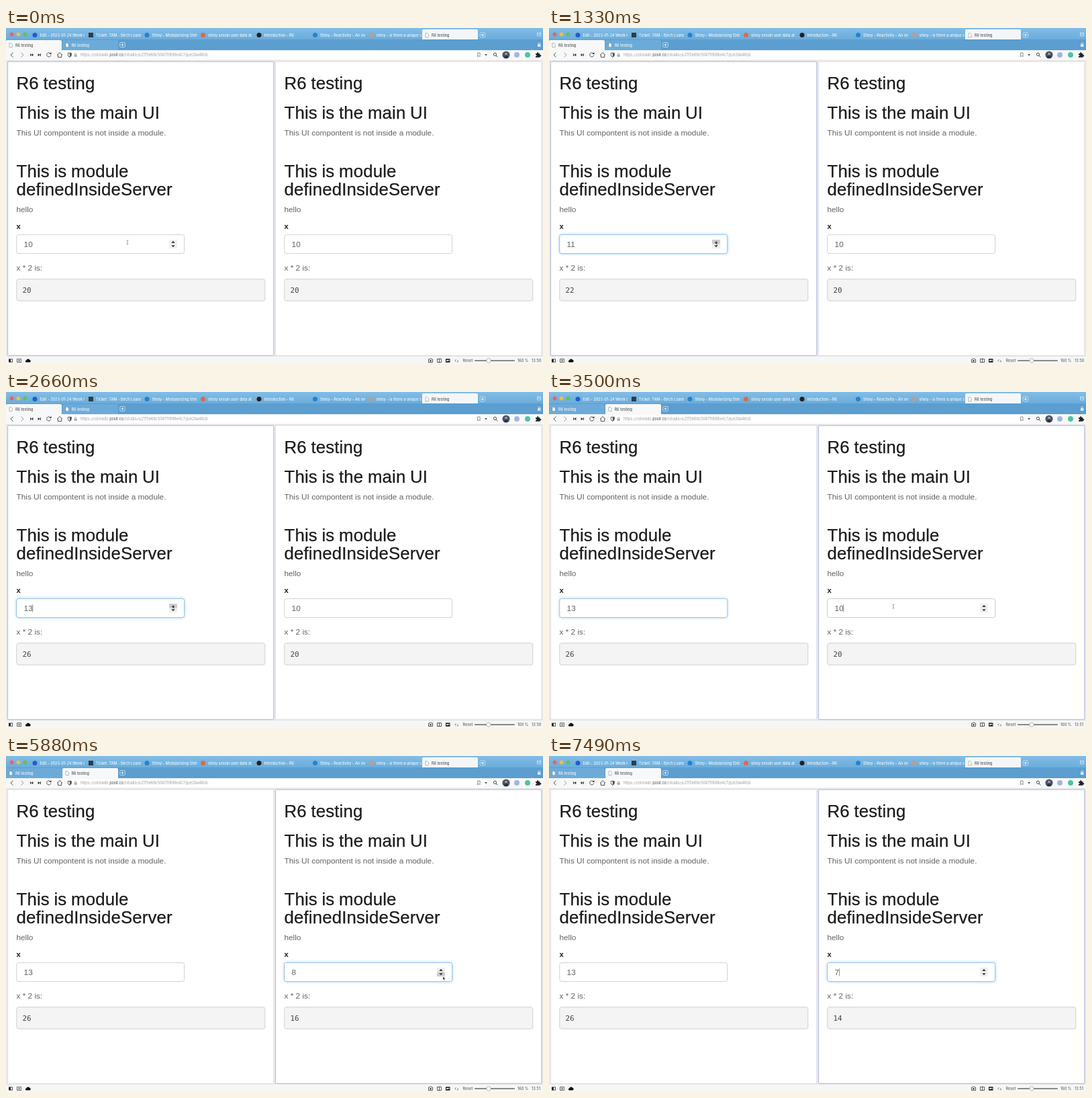
An HTML page for the animation above (7700 ms loop, 800 by 500 pixels).

```html
<!DOCTYPE html>
<html lang="en">
<head>
<meta charset="utf-8">
<title>R6 testing</title>
<style>
  html, body { margin: 0; height: 100%; overflow: hidden; background: #fff; }
  svg#stage { display: block; width: 100vw; height: 100vh; }
  text { white-space: pre; }
  .ui { font: 500 5.5px Inter, sans-serif; }
  .url { font-weight: 400; }
  .h { font: 25.8px "Liberation Sans", Arial, sans-serif; letter-spacing: .15px; word-spacing: -.7px;
       fill: #1c1c1c; stroke: #1c1c1c; stroke-width: .25px; }
  .p { font: 11.8px "Liberation Sans", Arial, sans-serif; fill: #626262; }
  .b { font: bold 11.3px "Liberation Sans", Arial, sans-serif; fill: #222; }
  .code { font: 11px "DejaVu Sans Mono", monospace; fill: #444; }
  .line { fill: none; stroke: #444; stroke-width: .9; }
  .glow { filter: drop-shadow(0 0 2.2px rgba(102, 175, 233, .6)); }
</style>
</head>
<body>
<svg id="stage" viewBox="0 0 800 500" preserveAspectRatio="none">
  <defs>
    <linearGradient id="bar" x2="0" y2="1">
      <stop offset="0" stop-color="#82bde6"/><stop offset="1" stop-color="#6aacdb"/>
    </linearGradient>
  </defs>
  <g id="chrome"></g>
  <g id="live"></g>
</svg>
<script>
const LOOP = 7700, STEP = 70, PANE_SHIFT = 399;
const SWITCH = 3480;   // second pane takes the focus
const FADE = 150, BLINK = 500, OUTPUT_LAG = 140;

const CLICKS = [
  [[0, 10], [770, 11], [1540, 12], [2310, 13]],
  [[0, 10], [4550, 9], [5320, 8], [6160, 7]],
];
// time, x, y of the pointer
const POINTER = [
  [0, 181, 319], [210, 181, 319], [630, 248, 317], [2730, 248, 317], [3300, 513, 319],
  [3570, 513, 319], [4130, 651, 328], [6790, 651, 328], [7000, 520, 320],
];
const POINTER_HIDDEN = 6860;

const rect = (x, y, w, h, fill, more = '') =>
  `<rect x="${x}" y="${y}" width="${w}" height="${h}" fill="${fill}" ${more}/>`;
const disc = (x, y, r, fill, more = '') => `<circle cx="${x}" cy="${y}" r="${r}" fill="${fill}" ${more}/>`;
const path = (d, more = 'class="line"') => `<path d="${d}" ${more}/>`;
const solid = (d, fill = '#333') => path(d, `fill="${fill}"`);
const text = (x, y, cls, str, more = '') => `<text x="${x}" y="${y}" class="${cls}" ${more}>${str}</text>`;
const clipped = (x, y, w, str, fill) =>
  `<svg x="${x}" y="${y - 8}" width="${w}" height="12">${text(0, 8, 'ui', str, `fill="${fill}"`)}</svg>`;
const page = (x, y) => path(`M${x - 2} ${y - 3}h2.6l1.6 1.6v4.4h-4.2z`, 'fill="#fff" stroke="#888" stroke-width=".6"');
const plus = (x, y) => rect(x - 3.8, y - 3.5, 7.6, 7, 'none', 'rx="1.5" stroke="#cfe4f4" stroke-width=".8"') +
  path(`M${x - 2} ${y}h4M${x} ${y - 2}v4`, 'stroke="#fff" stroke-width=".8"');
const tab = (x, y, w, h, fill) => solid(`M${x} ${y + h}v${2 - h}q0-2 2-2h${w - 4}q2 0 2 2v${h - 2}z`, fill);

function titleBar() {
  const titles = [
    ['#1f5fd0', 'Edit – 2023-01-24 Week r'], ['#333b45', 'Ticket: TAM – Birch Loans'],
    ['#2583cf', 'Shiny – Modularizing Shin'], ['#de6a45', 'shiny sessin user data at 2'],
    ['#222', 'Introduction – R6'], ['#2583cf', 'Shiny – Reactivity – An ove'],
    ['#b9a08f', 'shiny – is there a unique s'],
  ];
  let out = rect(0, 0, 800, 17, 'url(#bar)') + rect(0, 17, 800, 16, '#5b9ecf');
  ['#f2605a', '#f3bd3f', '#5cc454'].forEach((c, i) => out += disc(8.5 + 10 * i, 9.5, 2.9, c));
  titles.forEach(([color, title], i) => {
    const x = 43 + 83.5 * i;
    out += (i === 1 ? rect(x - 3.5, 7, 7, 7, color) : disc(x, 10.5, 3.5, color)) + clipped(x + 7.5, 12.7, 67, title, '#f4f9fd');
  });
  return out + tab(620, 2, 83, 15, '#f3f7fa') + page(627, 10.8) + clipped(634, 12.7, 60, 'R6 testing', '#555') +
    plus(710, 10.5) + plus(173.5, 25) +
    path('M791.5 7h5v5h-5zM791.5 9h5', 'fill="none" stroke="#d5e7f5" stroke-width=".8"') +
    rect(792, 24, 4.5, 4, '#d5e7f5') + path('M793 24v-2h2.5v2', 'fill="none" stroke="#d5e7f5" stroke-width=".7"');
}

function toolBar() {
  return rect(0, 33, 800, 16, '#f8f8f8') + rect(89, 34.5, 625, 11.5, '#fff', 'rx="2"') + rect(0, 48, 800, 1, '#e2e2e2') +
    path('M10.5 36.5l-3.5 3.5 3.5 3.5') + path('M22.5 36.5l3.5 3.5-3.5 3.5', 'class="line" opacity=".6"') +
    solid('M36 38h.9v4h-.9zM40.4 38v4l-3.5-2zM47.6 38v4l3.5-2zM51.1 38h.9v4h-.9z') +
    path('M66 37.8a3.1 3.1 0 1 0 .8 2.6') + solid('M64.5 38.9h3v-3z') +
    path('M76 40.3l4-3.8 4 3.8M77.3 39.5v4h5.4v-4') +
    path('M92.3 37.3h5v3q0 2-2.5 3.2-2.5-1.2-2.5-3.2z') + solid('M94.8 37.3h2.5v3q0 2-2.5 3.2z', '#555') +
    rect(101.5, 39.5, 4.2, 3.3, '#aaa') + path('M102.4 39.5v-1.8h2.4v1.8', 'fill="none" stroke="#aaa" stroke-width=".7"') +
    text(111, 42, 'ui url', 'https://colorado.<tspan fill="#444">posit.co</tspan>/rstudio/s/2115e68c50871f898e4c7/p/e2ba46cb', 'fill="#999"') +
    path('M702.5 37h3.6v5.8l-1.8-1.5-1.8 1.5z', 'fill="none" stroke="#666" stroke-width=".7"') + solid('M713.2 39h3.6l-1.8 2.2z') +
    disc(728.5, 39.3, 2.1, 'none', 'stroke="#333" stroke-width=".9"') + path('M730 41l2.4 2.4') +
    disc(745, 40, 5.6, '#46566f') + disc(745, 38.5, 1.8, '#c39a84') + solid('M741.5 43.5q3.5-5 7 0-3.5 3-7 0z', '#26303f') +
    disc(761, 40, 4, '#a5b5e5') + disc(777, 40, 4, '#4cc5a0') +
    solid('M789 38h2.2a1.2 1.2 0 1 1 2 0h2.3v2.2a1.2 1.2 0 1 1 0 2v1.6h-6.5v-2a1 1 0 1 0 0-1.8z', '#222');
}

function statusBar() {
  return rect(0, 488, 800, 12, '#f6f6f6') + rect(0, 488, 800, .6, '#ddd') +
    rect(4, 492.5, 6, 5, '#222') + rect(7, 493.3, 2.3, 3.4, '#fff') +
    path('M16.5 492.5h6v5h-6zM18 494.3h3M18 495.8h3', 'fill="none" stroke="#333" stroke-width=".7"') +
    solid('M30.5 497.5a1.6 1.6 0 0 1 0-3.2 2.5 2.5 0 0 1 4.6-.5 1.9 1.9 0 0 1 .2 3.7z', '#111') +
    path('M629.5 493h1.5l.6-1h2l.6 1h1.3v4.6h-6z', 'fill="none" stroke="#333" stroke-width=".8"') + disc(632.5, 495.2, 1.2, '#333') +
    path('M642.5 492.5h6v5h-6zM645.5 492.5v5', 'fill="none" stroke="#333" stroke-width=".8"') +
    rect(655, 492.3, 6.5, 5.4, '#222') + solid('M656 494h4.5v1.8l-1.5-1-1.5 1.2-1.5-.7z', '#fff') +
    path('M670.5 493.3l-1.7 1.7 1.7 1.7M672 494.5l1.8 1.5-1.8 1.5', 'fill="none" stroke="#444" stroke-width=".7"') +
    text(680.5, 497, 'ui', 'Reset', 'fill="#666"') +
    rect(698, 494.3, 60, 1.4, '#666', 'rx=".7"') + disc(719, 495, 3.2, '#fff', 'stroke="#888" stroke-width=".6"') +
    text(762, 497, 'ui', '160 %', 'fill="#666"');
}

function paneText() {
  return text(15.5, 90.5, 'h', 'R6 testing') + text(15.5, 134.7, 'h', 'This is the main UI') +
    text(15.5, 160, 'p', 'This UI compontent is not inside a module.') +
    text(15.5, 221.6, 'h', 'This is module') + text(15.5, 249, 'h', 'definedInsideServer') +
    text(15.5, 274, 'p', 'hello') + text(15.5, 299.3, 'b', 'x') + text(15.5, 360.5, 'p', 'x * 2 is:') +
    rect(15.8, 373.7, 370, 32.4, '#f4f4f4', 'rx="3" stroke="#ccc" stroke-width=".9"');
}

const lastClick = (clicks, t) => clicks.filter(([at]) => at <= t).pop();
const clamp01 = v => Math.max(0, Math.min(1, v));

function pointerAt(t) {
  const i = POINTER.findLastIndex(([at]) => at <= t);
  const [t0, x0, y0] = POINTER[i], [t1, x1, y1] = POINTER[i + 1] || [LOOP, x0, y0];
  const k = (t - t0) / (t1 - t0), ease = k * k * (3 - 2 * k);
  return { x: x0 + (x1 - x0) * ease, y: y0 + (y1 - y0) * ease };
}

function spinner(pointer) {
  const over = pointer.x > 243 && pointer.x < 255, upper = pointer.y < 321.5;
  return rect(243, 315, 12, 13, '#efefef', 'rx="1"') +
    (over ? rect(243, upper ? 315 : 321.5, 12, 6.5, '#cdcdcd') : '') +
    solid('M246.2 320l2.8-3.2 2.8 3.2zM246.2 323.2h5.6l-2.8 3z', '#3a3a3a');
}

function pane(i, t, cursor) {
  const pointer = { x: cursor.x - i * PANE_SHIFT, y: cursor.y };
  const [clickedAt, value] = lastClick(CLICKS[i], t);
  const output = 2 * lastClick(CLICKS[i], Math.max(0, t - OUTPUT_LAG))[1];
  const focusAt = i ? SWITCH : CLICKS[0][1][0], blurAt = i ? LOOP : SWITCH;
  const glow = clamp01((t - focusAt) / FADE) - clamp01((t - blurAt) / FADE);
  const focused = t >= focusAt && t < blurAt;
  const caret = focused && (t - Math.max(clickedAt, focusAt)) % (2 * BLINK) < BLINK;
  const active = (t >= SWITCH) === !!i;
  const box = (stroke, more) => rect(15.8, 307.6, 249.8, 28, '#fff', `rx="3" stroke="${stroke}" ${more}`);
  return `<g transform="translate(${i * PANE_SHIFT})">` +
    rect(2.6, 50, 396.2, 437.3, '#fff', `rx="1" stroke="${active ? '#b0b4e4' : '#e0e0e0'}" stroke-width="1"`) +
    paneText() + box('#ccc', 'stroke-width=".9"') +
    (glow > 0 ? box('#94c5ef', `class="glow" stroke-width=".9" opacity="${glow}"`) : '') +
    text(26.6, 326, 'p', value) +
    (caret ? rect(26.5 + 6.5 * String(value).length, 316, .7, 11.5, '#666') : '') +
    (pointer.x > 16 && pointer.x < 265 ? spinner(pointer) : '') +
    text(24.5, 393.5, 'code', output) + '</g>';
}

function drawPointer({ x, y }) {
  const inPane = x > 400 ? x - PANE_SHIFT : x;
  const overText = inPane > 16 && inPane < 243;
  const d = overText ? 'M-1.3-3q1.3 0 1.3.8 0-.8 1.3-.8M0-2.4v5M-1.3 3.2q1.3 0 1.3-.8 0 .8 1.3.8' : 'M0 0v5.2l1.2-1.1.9 2 .9-.4-.9-1.9h1.6z';
  const style = overText ? 'fill="none" stroke="#777" stroke-width=".7"'
    : 'fill="#111" stroke="#fff" stroke-width=".5"';
  return path(d, `transform="translate(${x} ${y})" ${style}`);
}

function paneTabs(t) {
  return [0, 1].map(i => {
    const active = (t >= SWITCH) === !!i, x = 84 * i;
    return tab(x, 18, 83, 15, active ? '#f8f8f8' : '#6cabd9') + page(x + 7, 25.6) +
      clipped(x + 14 - .5 * i, 27.5, 60, 'R6 testing', active ? '#555' : '#f4f9fd');
  }).join('');
}

function draw(t) {
  const cursor = pointerAt(t);
  live.innerHTML = paneTabs(t) + pane(0, t, cursor) + pane(1, t, cursor) +
    text(783, 497, 'ui', t < SWITCH ? '13:50' : '13:51', 'fill="#666"') +
    (t < POINTER_HIDDEN ? drawPointer(cursor) : '');
}

const live = document.getElementById('live');
document.getElementById('chrome').innerHTML =
  rect(0, 49, 800, 440, '#e9e9e9') + titleBar() + toolBar() + statusBar();

const start = performance.now();
let shown = -1;
function tick() {
  const t = Math.floor((performance.now() - start) % LOOP / STEP) * STEP;
  if (t !== shown) draw(shown = t);
  requestAnimationFrame(tick);
}
tick();
</script>
</body>
</html>
```
